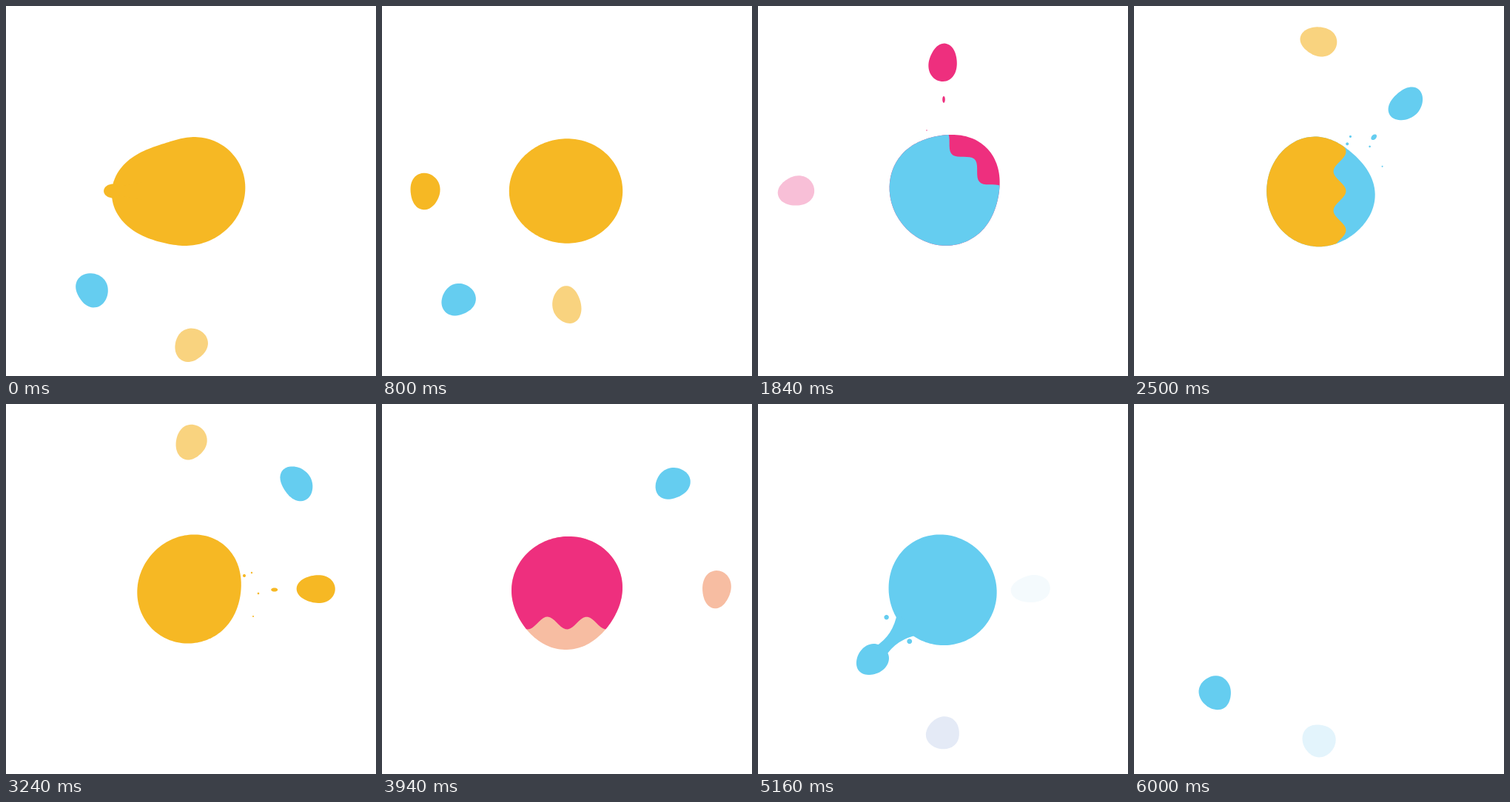
These frames come from a looping animation (500x500 px, 6020 ms). An HTML page:

```html
<!DOCTYPE html>
<html lang="en">
<head>
<meta charset="utf-8">
<title>Bouncing drops</title>
<style>
  html, body { margin: 0; width: 100%; height: 100%; overflow: hidden; background: #fff; }
  svg { display: block; width: 100vw; height: 100vh; }
</style>
</head>
<body>
<svg viewBox="0 0 500 500">
  <defs><clipPath id="core-clip"><path id="clip"/></clipPath></defs>
  <path id="core"/>
  <g clip-path="url(#core-clip)"><path id="flood"/></g>
</svg>
<script>
const LOOP = 6020, LAP = 2860, LAND = 2320, FLOOD_TIME = 280;
const CORE_RADIUS = 73, DROP_RADIUS = 22.3;
const ORANGE = [246, 184, 36], SAND = [249, 211, 127], PINK = [238, 47, 126];
const ROSE = [248, 191, 215], CYAN = [101, 205, 240], ICE = [227, 244, 252];
const MIST = [244, 250, 253], WHITE = [255, 255, 255];

// Distance from the middle, radial stretch and core bulge over one lap
const DISTANCE = [[0, 107], [150, 137], [240, 150], [345, 167], [430, 173], [570, 184],
  [700, 189], [870, 194], [1080, 202], [1450, 208], [1710, 206], [1840, 198],
  [2090, 180], [2250, 154], [2300, 119], [2400, 50]];
const STRETCH = [[0, 0], [150, .13], [430, .1], [800, -.05], [1080, -.09], [1450, 0],
  [1840, .06], [2100, .08], [2300, .15]];
const BULGE = [[0, 33], [150, 1], [345, -7], [500, 2], [800, 3], [1000, 0], [2450, 0],
  [2510, 8], [2670, 32], [2860, 33]];

const drops = [
  { dir: [-1, 0], offset: 0, colors: [[800, ORANGE], [1200, ROSE], [2200, ROSE], [2340, ORANGE],
    [3700, ORANGE], [4040, ROSE], [4700, ROSE], [5100, MIST], [5600, MIST], [5950, WHITE]] },
  { dir: [0, 1], offset: 1450, colors: [[800, SAND], [950, PINK], [1900, PINK], [2300, SAND],
    [3600, SAND], [3750, PINK], [4790, PINK], [5180, ICE]] },
  { dir: [-Math.SQRT1_2, Math.SQRT1_2], offset: 700, colors: [[0, CYAN]] }
];

const svg = document.querySelector("svg");
const byId = id => document.getElementById(id);
const core = byId("core"), clip = byId("clip"), flood = byId("flood");
for (const drop of drops) {
  drop.node = svg.appendChild(document.createElementNS("http://www.w3.org/2000/svg", "path"));
}

const mix = (a, b, k) => a + (b - a) * k;
const clamp = k => Math.max(0, Math.min(1, k));

function segment(keys, t) {
  let i = 0;
  while (i < keys.length - 2 && t > keys[i + 1][0]) i++;
  const a = keys[i], b = keys[i + 1] || a;
  return [a[1], b[1], clamp((t - a[0]) / (b[0] - a[0] || 1))];
}
const valueAt = (keys, t) => mix(...segment(keys, t));
function colorAt(keys, t) {
  const [a, b, k] = segment(keys, t);
  return `rgb(${a.map((v, i) => Math.round(mix(v, b[i], k)))})`;
}

// Stage point from a position along and across a direction
const place = ([x, y], along, across) =>
  [250 + x * along - y * across, 250 + y * along + x * across].map(v => v.toFixed(2)).join(" ");

function closed(count, pointAt) {
  const points = Array.from({ length: count }, (_, i) => pointAt(i / count * 2 * Math.PI));
  return "M" + points.join("L") + "Z";
}

const oval = (dir, along, across, a, b) =>
  closed(24, q => place(dir, along + a * Math.cos(q), across + b * Math.sin(q)));

function corePath(t) {
  return closed(160, q => {
    const x = Math.cos(q), y = Math.sin(q);
    let r = CORE_RADIUS + 2.2 * Math.cos(2 * q - (t - 800) / 540);
    for (const { phase, side } of drops) {
      const sign = phase > 2400 ? -1 : 1;
      const facing = Math.max(0, sign * (x * side[0] + y * side[1]));
      r += valueAt(BULGE, phase) * facing ** 3.5;
    }
    return place([1, 0], x * r, y * r);
  });
}

function floodPath({ side, age }) {
  const dir = side.map(v => -v);
  const front = -80 + age * .6;
  let d = "M" + place(dir, -160, -130);
  for (let s = -130; s <= 130; s += 3) {
    d += "L" + place(dir, front + 8.5 * Math.cos(s / 53 * 2 * Math.PI), s);
  }
  return d + "L" + place(dir, -160, 130) + "Z";
}

function splashes(dir, p) {
  const fade = clamp((500 - p) / 340);
  let d = "";
  if (p > 90 && p < 480) {
    d += oval(dir, 82, mix(-18, -22, clamp((p - 140) / 200)), 3.4 * fade, 3.4 * fade);
  }
  if (p > 90 && p < 250) d += oval(dir, 81, 27, 3.2 * fade, 3.2 * fade);
  if (p > 230 && p < 460) d += oval(dir, 105 + (p - 345) * .22, 1, 4.5, 4.8 * fade + .8);
  if (p > 230 && p < 400) {
    d += oval(dir, 72, -18, 2, 2) + oval(dir, 91, 6, 1.3, 1.3) + oval(dir, 84, 37, 1, 1);
  }
  return d;
}

function neck(dir, p, distance) {
  const k = clamp(p / 150), base = mix(12, 22, k), tip = mix(6, 10, k);
  const end = distance - mix(2, 16, k), bend = mix(90, 92, k), waist = mix(7, 1, clamp(p / 200));
  return `M${place(dir, 66, -base)}Q${place(dir, bend, -waist)} ${place(dir, end, -tip)}` +
    `L${place(dir, end, tip)}Q${place(dir, bend, waist)} ${place(dir, 66, base)}Z`;
}

function dropPath({ phase, side, offset }, t) {
  if (phase > 2400 && phase < 2800) return "";
  const budding = phase >= 2800;
  const dir = budding ? side.map(v => -v) : side;
  const p = budding ? 0 : phase;
  const distance = valueAt(DISTANCE, p), stretch = valueAt(STRETCH, p);
  const size = budding ? 10 * (phase - 2800) / 60 : mix(10, DROP_RADIUS, clamp(p / 150));
  const wobble = size / DROP_RADIUS;
  const body = closed(60, q => {
    const r = size + wobble * (1.3 * Math.cos(2 * q + t / 260 + offset) +
      .7 * Math.cos(3 * q - t / 340 + offset));
    return place(dir, distance + r * Math.cos(q) * (1 + stretch), r * Math.sin(q) * (1 - stretch));
  });
  const link = !budding && p < 215 ? neck(dir, p, distance) : "";
  return body + link + splashes(dir, p);
}

function draw(t) {
  for (const drop of drops) {
    const total = t + drop.offset;
    const sign = Math.floor(total / LAP) % 2 ? -1 : 1;
    drop.phase = total % LAP;
    drop.side = drop.dir.map(v => v * sign);
    drop.age = (drop.phase - LAND + LAP) % LAP;
    drop.fill = colorAt(drop.colors, t);
  }
  const [newest, previous] = [...drops].sort((a, b) => a.age - b.age);
  const flooding = newest.age < FLOOD_TIME;
  const outline = corePath(t);
  core.setAttribute("d", outline);
  clip.setAttribute("d", outline);
  core.setAttribute("fill", flooding ? previous.fill : newest.fill);
  flood.setAttribute("d", flooding ? floodPath(newest) : "");
  flood.setAttribute("fill", newest.fill);
  for (const drop of drops) {
    drop.node.setAttribute("d", dropPath(drop, t));
    drop.node.setAttribute("fill", drop.fill);
  }
}

let start;
function tick(now) {
  start ??= now;
  draw(Math.max(0, now - start) % LOOP);
  requestAnimationFrame(tick);
}
draw(0);
requestAnimationFrame(tick);
</script>
</body>
</html>
```
